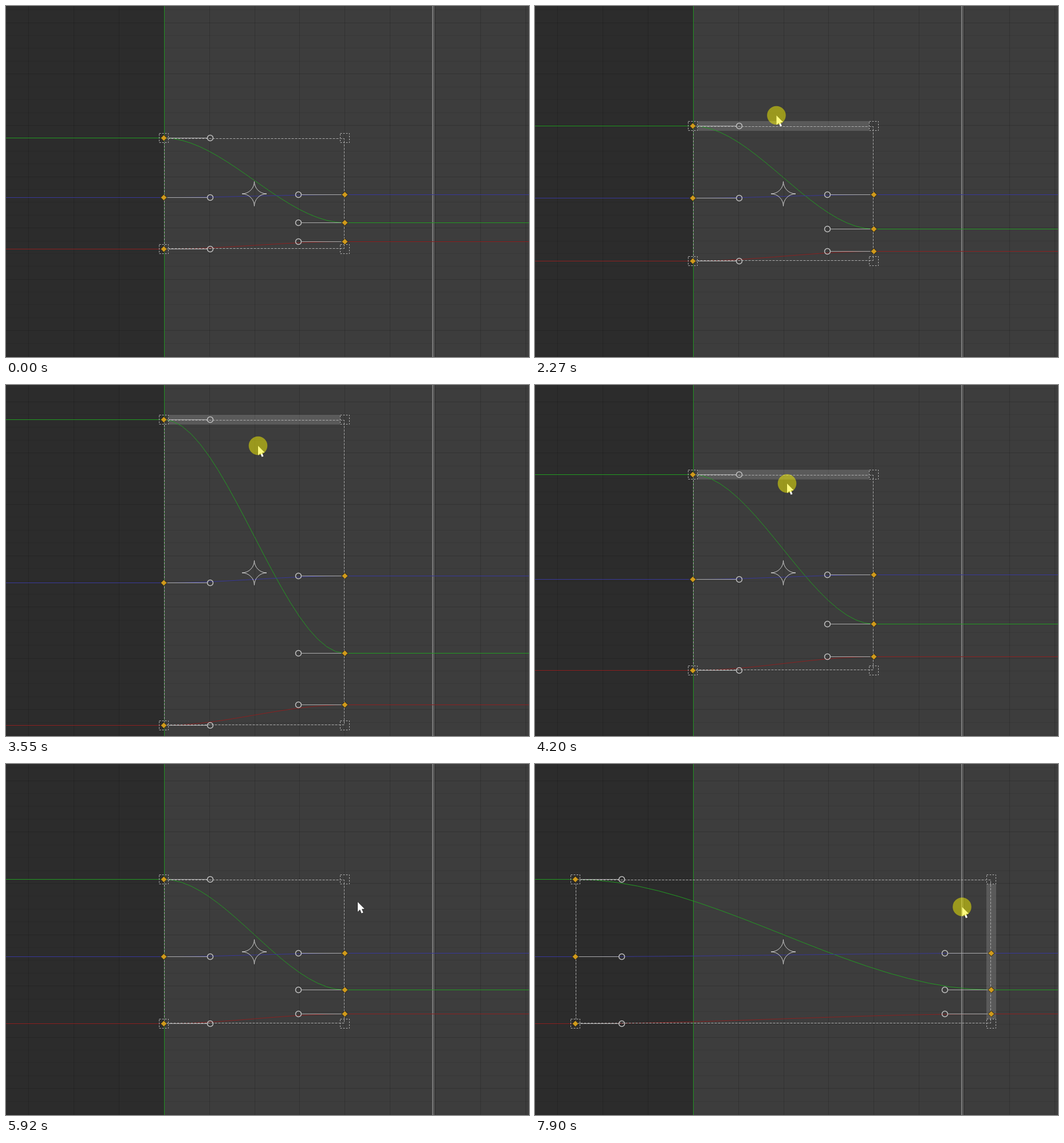
These frames come from a looping animation (913x613 px, 7.99 s). An HTML page with a canvas:

```html
<!DOCTYPE html>
<html>
<head>
<meta charset="utf-8">
<title>Curve editor</title>
<style>
html, body { margin: 0; width: 100%; height: 100%; overflow: hidden; background: #3d3d3d; }
canvas { display: block; }
</style>
</head>
<body>
<canvas id="stage" width="913" height="613"></canvas>
<script>
const W = 913, H = 613, LOOP = 7990, STEP = 89.43;
const CX = 433.5, CY = 327.5, HANDLE = 81;
const ctx = document.getElementById('stage').getContext('2d');

// key offsets from the centre, as shares of the half height
const tracks = [
  { color: '#229a22', from: -1, to: .529 },
  { color: '#38389a', from: .069, to: .021 },
  { color: '#8c2020', from: 1, to: .863 }
];

const px = v => Math.floor(v) + .5;

// the screen refreshes in even steps
const snap = t => 30 + STEP * Math.round((t - 30) / STEP);

function ease(t, start, end) {
  const u = Math.min(1, Math.max(0, (t - start) / (end - start)));
  return u * u * (3 - 2 * u);
}

// each move: new value, start time, end time
function follow(t, v, ...moves) {
  for (const [to, start, end] of moves) v += (to - v) * ease(t, start, end);
  return v;
}

const halfHeight = t => follow(t, 97, [268, 1985, 3283], [106.5, 3460, 4820], [126, 4950, 5260]);
const halfWidth = t => follow(t, 157.75, [363, 6620, 7845]);
const pointerX = t => follow(t, 544, [409, 30, 460], [417, 600, 790], [440, 1860, 3300],
  [614, 5440, 5920], [598, 6050, 6440], [764, 6610, 7480], [745.5, 7480, 7900]);
const pointerY = t => follow(t, -20, [238, 30, 460], [234, 600, 790], [105.4, 1860, 2906],
  [216, 3460, 4820], [188.5, 4900, 5260], [241, 5440, 5920], [249.5, 6050, 7480]);

function path(points, closed) {
  ctx.beginPath();
  for (const [x, y] of points) ctx.lineTo(x, y);
  if (closed) ctx.closePath();
}

function line(color, ...points) {
  ctx.strokeStyle = color;
  path(points);
  ctx.stroke();
}

function rect(color, x, y, w, h) {
  ctx.fillStyle = color;
  ctx.fillRect(x, y, w, h);
}

function dashedRect(color, dash, x, y, w, h) {
  ctx.setLineDash(dash);
  ctx.strokeStyle = color;
  ctx.strokeRect(x, y, w, h);
  ctx.setLineDash([]);
}

function background() {
  rect('#3d3d3d', 0, 0, W, H);
  rect('#2c2c2c', 0, 0, 276, H);
  for (let x = 39.5; x < W; x += 78.9) rect('rgba(0,0,0,.15)', Math.floor(x), 0, 1, H);
  for (let i = 0; i < 28; i++) {
    rect(`rgba(0,0,0,${i % 4 === 1 ? .17 : .1})`, 0, Math.floor(6.8 + i * 22.4), W, 1);
  }
  rect('#219321', 276, 0, 1, H);
  rect('#585858', 744, 0, 4, H);
  rect('#929292', 744, 0, 1, H);
}

function curve({ color, from, to }, left, right, h) {
  const y0 = px(CY + from * h), y1 = px(CY + to * h);
  const points = [[0, y0]];
  for (let i = 0; i <= 20; i++) {
    const u = i / 20;
    points.push([left + (right - left) * u, y0 + (y1 - y0) * ease(u, 0, 1)]);
  }
  line(color, ...points, [W, y1]);
}

function handle(x, y, dir) {
  const end = x + dir * HANDLE;
  line('#acacac', [x, y], [end - dir * 5, y]);
  ctx.lineWidth = 1.5;
  ctx.strokeStyle = '#c0c0c0';
  ctx.beginPath();
  ctx.arc(end, y, 5, 0, 7);
  ctx.stroke();
  ctx.lineWidth = 1;
}

function diamond(x, y) {
  path([[x, y - 5.5], [x + 5.5, y], [x, y + 5.5], [x - 5.5, y]], true);
  ctx.fillStyle = '#d09a1c';
  ctx.fill();
  ctx.strokeStyle = '#1c1a12';
  ctx.stroke();
}

function corner(x, y) {
  ctx.strokeStyle = '#242424';
  ctx.strokeRect(x - 8, y - 8, 16, 16);
  dashedRect('#b4b4b4', [3, 2], x - 8, y - 8, 16, 16);
}

// four quarter circles bent inwards
function star() {
  const r = 21.5, y = CY + .5;
  ctx.strokeStyle = '#d0d0d0';
  ctx.beginPath();
  for (let i = 0; i < 4; i++) {
    const a = i * Math.PI / 2 + Math.PI / 4, d = r * Math.SQRT2;
    ctx.arc(CX + d * Math.cos(a), y + d * Math.sin(a), r, a - Math.PI * .75, a + Math.PI * .75, true);
  }
  ctx.closePath();
  ctx.stroke();
}

function drawPointer(x, y, pressed) {
  ctx.save();
  ctx.translate(x, y);
  path([[0, 0], [0, 17], [4, 13.3], [6.6, 19.8], [9.6, 18.5], [7, 12.2], [11.8, 12]], true);
  ctx.strokeStyle = 'rgba(20,20,20,.7)';
  ctx.stroke();
  ctx.fillStyle = '#fff';
  ctx.fill();
  if (pressed) {
    ctx.fillStyle = 'rgba(250,245,0,.5)';
    ctx.beginPath();
    ctx.arc(0, 0, 16.3, 0, 7);
    ctx.fill();
  }
  ctx.restore();
}

function draw(t) {
  const h = halfHeight(t), w = halfWidth(t), x = pointerX(t), y = pointerY(t);
  const left = px(CX - w), right = px(CX + w), top = px(CY - h), bottom = px(CY + h);
  const dragY = t >= 1690 && t < 5440, dragX = t >= 6440;
  const overTop = Math.abs(y - top) < 9 && x > left && x < right;
  const overRight = Math.abs(x - right) < 9 && y > top && y < bottom;
  const glow = 'rgba(255,255,255,.15)';

  background();
  ctx.lineWidth = 1;
  if (dragY || overTop) rect(glow, left + 8.5, top - 8.5, right - left - 17, 17);
  if (dragX || overRight) rect(glow, right - 8.5, top + 8.5, 17, bottom - top - 17);

  for (const track of tracks) curve(track, left, right, h);
  dashedRect('#acacac', [4, 2], left + 1, top + 1, right - left - 2, bottom - top - 2);

  for (const { from, to } of tracks) {
    handle(left, px(CY + from * h), 1);
    handle(right, px(CY + to * h), -1);
  }
  for (const cx of [left, right]) for (const cy of [top, bottom]) corner(cx, cy);
  for (const { from, to } of tracks) {
    diamond(left, px(CY + from * h));
    diamond(right, px(CY + to * h));
  }
  star();
  drawPointer(x, y, dragY || dragX);
}

function tick() {
  draw(snap(performance.now() % LOOP));
  requestAnimationFrame(tick);
}
tick();
</script>
</body>
</html>
```
